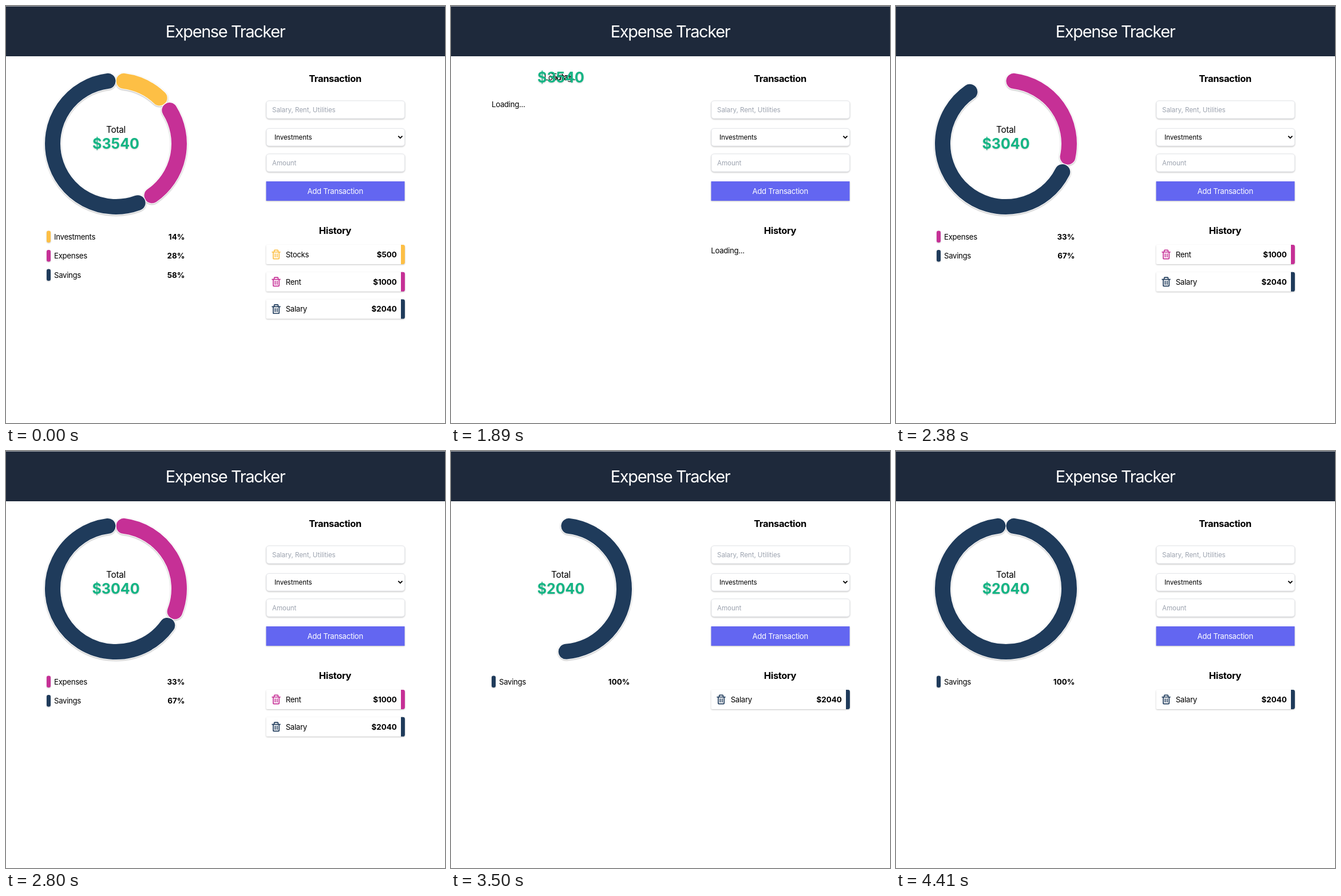
An HTML page for the animation above (4970 ms loop, 767 px wide and 730 px high).

```html
<!DOCTYPE html>
<html lang="en">
<head>
<meta charset="utf-8">
<title>Expense Tracker</title>
<style>
  html, body { margin: 0; width: 100%; height: 100%; overflow: hidden; background: #fff; }
  svg { display: block; font: 13.2px Inter, Roboto, sans-serif; font-optical-sizing: none; letter-spacing: -.3px; }
  .title { font-size: 29px; letter-spacing: -1.4px; fill: #fff; }
  .head { font-size: 16.5px; font-weight: 700; letter-spacing: -.38px; }
  .mid { text-anchor: middle; }
  .field { font-size: 11.6px; letter-spacing: -.06px; }
  .hint { fill: #9ca3af; }
  .total { font-size: 15.4px; }
  .sum { font-size: 25px; font-weight: 700; letter-spacing: 0; fill: #14b584; filter: drop-shadow(.5px 1px 1px rgb(0 0 0 / .2)); }
  .num { font-size: 13.4px; font-weight: 700; letter-spacing: 0; text-anchor: end; }
  .box { fill: #fff; stroke: #e5e7eb; }
  .shade { filter: drop-shadow(0 1px 1px rgb(0 0 0 / .24)); }
  .ring { fill: none; stroke-linecap: round; filter: drop-shadow(0 1px 1px rgb(0 0 0 / .3)); }
</style>
</head>
<body>
<svg width="767" height="730" viewBox="0 0 767 730">
  <rect width="767" height="88" fill="#1e293b"/>
  <rect width="767" height="1" fill="#a5a9b0"/>
  <text class="title mid" x="383" y="55">Expense Tracker</text>
  <text class="head mid" x="575" y="133">Transaction</text>
  <g class="shade">
    <rect class="box" x="455" y="166" width="241.5" height="31" rx="4.5"/>
    <rect class="box" x="455" y="214.5" width="241.5" height="30.5" rx="4.5"/>
    <rect class="box" x="455" y="259" width="241.5" height="31" rx="4.5"/>
    <rect x="454.5" y="307" width="242" height="34" fill="#6366f1"/>
  </g>
  <text class="field hint" x="465" y="185.7">Salary, Rent, Utilities</text>
  <text class="field" x="469" y="234">Investments</text>
  <path d="M685.3 227.6l3.6 3.6 3.6-3.6" fill="none" stroke="#000" stroke-width="1.8"/>
  <text class="field hint" x="465" y="278.6">Amount</text>
  <text class="mid" x="575.2" y="329" fill="#fff">Add Transaction</text>
  <text class="head mid" x="575" y="399">History</text>
  <g id="view"></g>
</svg>
<script>
const LOOP = 4970, STEP = 70, SPIN = 1000;
const view = document.getElementById('view');

const entries = [
  { name: 'Stocks', type: 'Investments', amount: 500, color: '#fdbf45' },
  { name: 'Rent', type: 'Expenses', amount: 1000, color: '#c63096' },
  { name: 'Salary', type: 'Savings', amount: 2040, color: '#1f3b5b' }
];
// Each stage drops one more entry: when loading shows, when the ring starts to grow
const stages = [
  { load: -SPIN, grow: -SPIN },
  { load: 1890, grow: 1906 },
  { load: 3290, grow: 3338 }
];

const sum = list => list.reduce((s, e) => s + e.amount, 0);
const easeOutQuart = p => 1 - (1 - p) ** 4;
const text = (x, y, str, cls = '') => `<text x="${x}" y="${y}" class="${cls}">${str}</text>`;

function arc(from, to, color) {
  const r = 110.5, cap = 7.25;
  const point = deg => {
    const a = deg * Math.PI / 180;
    return `${192 + r * Math.sin(a)} ${241 - r * Math.cos(a)}`;
  };
  const a = from + cap, b = Math.max(to - cap, a + .01);
  const d = `M${point(a)}A${r} ${r} 0 ${+(b - a > 180)} 1 ${point(b)}`;
  return `<path d="${d}" stroke="#fff" stroke-width="29.4"/><path d="${d}" stroke="${color}" stroke-width="27"/>`;
}

function ring(list, grown) {
  const turn = 360 * grown / sum(list);
  let at = 0;
  const arcs = list.map(e => arc(at, at += e.amount * turn, e.color));
  return `<g class="ring">${arcs.join('')}</g>`;
}

function legend(e, i, total) {
  const y = 404 + i * 33.5;
  return `<rect class="shade" x="71" y="${y - 10.5}" width="7" height="20.5" rx="3" fill="${e.color}"/>`
    + text(84, y + 4.8, e.type)
    + text(312.3, y + 4.8, Math.round(100 * e.amount / total) + '%', 'num');
}

function card(e, i) {
  const y = 435 + i * 47.8;
  return `<g class="shade"><rect x="454.5" y="${y - 17}" width="238" height="34" rx="2" fill="#fff"/>
    <path d="M690 ${y - 17}h3.5q3.4 0 3.4 3.4v27.2q0 3.4 -3.4 3.4h-3.5z" fill="${e.color}"/></g>
    <path transform="translate(461.8 ${y - 10.2}) scale(.85)" fill="${e.color}" fill-rule="evenodd"
      d="M5 20a2 2 0 0 0 2 2h10a2 2 0 0 0 2-2V8h2V6h-4V4a2 2 0 0 0-2-2H9a2 2 0 0 0-2 2v2H3v2h2zM9 4h6v2H9zM7 8h10v12H7zM9 10h2v8H9zM13 10h2v8h-2z"/>`
    + text(488.7, y + 4.8, e.name)
    + text(682.8, y + 4.8, '$' + e.amount, 'num');
}

function loading(total) {
  return text(192, 130, 'Loading...', 'mid') + text(192, 130, 'Total', 'total mid')
    + text(192, 134, '$' + total, 'sum mid')
    + text(71, 177.3, 'Loading...') + text(454.3, 433, 'Loading...');
}

function board(list, grown) {
  const total = sum(list);
  return ring(list, grown)
    + text(192, 221.5, 'Total', 'total mid') + text(192, 250, '$' + total, 'sum mid')
    + list.map((e, i) => legend(e, i, total) + card(e, i)).join('');
}

let shown = -1;
function frame(now) {
  const t = Math.floor(now % LOOP / STEP) * STEP;
  if (t !== shown) {
    shown = t;
    const n = stages.findLastIndex(s => t >= s.load);
    const { load, grow } = stages[n];
    view.innerHTML = t < load + STEP
      ? loading(sum(entries.slice(n - 1)))
      : board(entries.slice(n), easeOutQuart(Math.min(1, (t - grow) / SPIN)));
  }
  requestAnimationFrame(frame);
}
frame(performance.now());
</script>
</body>
</html>
```
